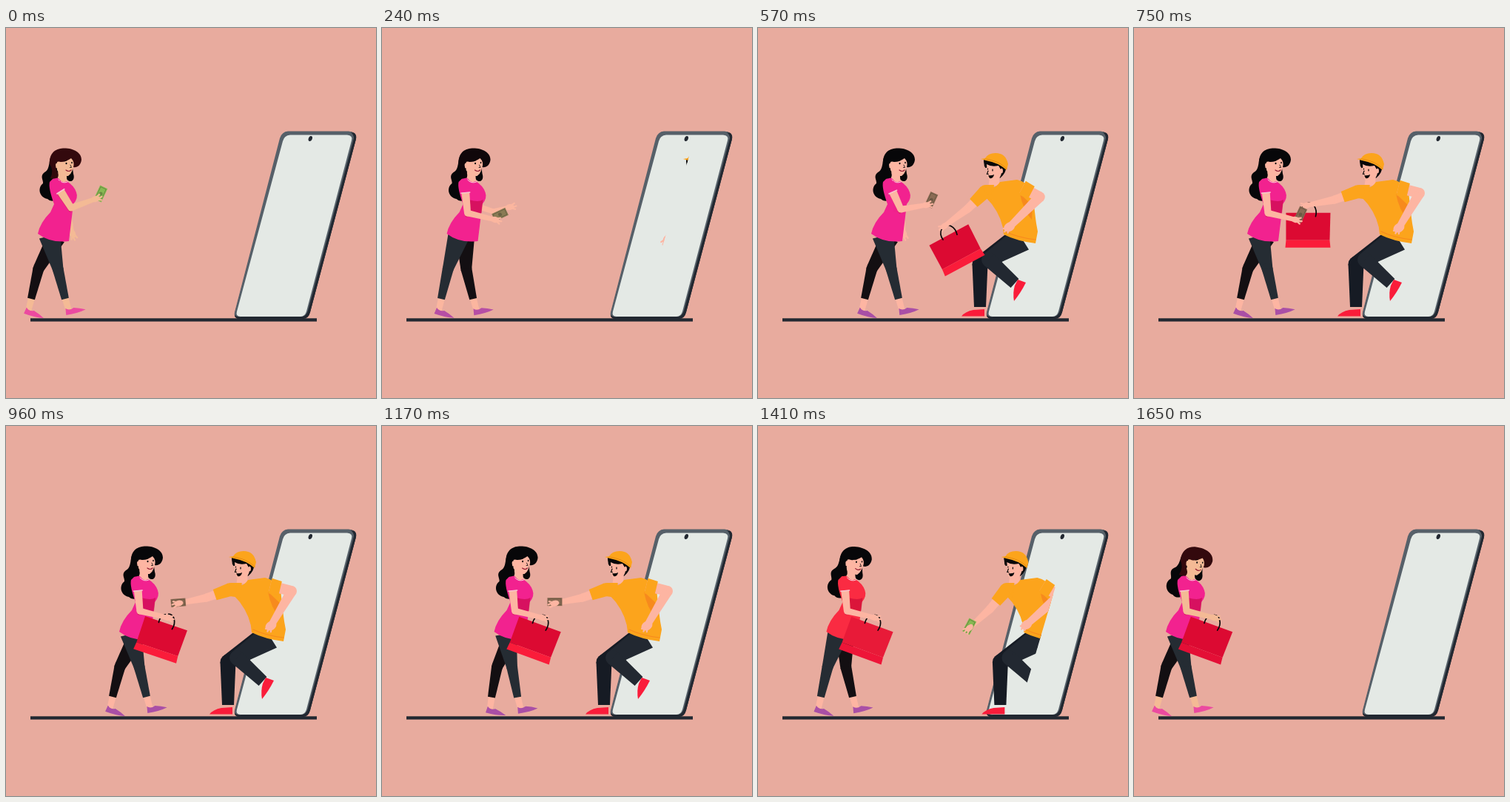
An HTML page with a canvas that plays this animation: 500x500 px, repeating every 1830 ms.

```html
<!DOCTYPE html>
<html lang="en">
<head>
<meta charset="utf-8">
<title>Delivery through the phone</title>
<style>
  html, body { margin: 0; width: 100%; height: 100%; overflow: hidden; background: #e8ab9e; }
  canvas { display: block; width: 500px; height: 500px; }
</style>
</head>
<body>
<canvas id="stage" width="500" height="500"></canvas>
<script>
const ctx = document.getElementById('stage').getContext('2d');
const LOOP = 1830, STEP = 30, LAST = 1650, STRIDE = 540, RAD = Math.PI / 180;
const INK = '#222831', BLACK = '#070709', RED = '#fa1c3a', ORANGE = '#fca41c', SKIN = '#fdb5a2';

const clamp = v => Math.max(0, Math.min(1, v));
const mix = (a, b, k) => a + (b - a) * k;
const mixPoint = (a, b, k) => a.map((v, i) => mix(v, b[i], k));
const shift = ([x, y], dx, dy = 0) => [x + dx, y + dy];
const polar = ([x, y], degrees, r) => [x + r * Math.cos(degrees * RAD), y + r * Math.sin(degrees * RAD)];
const toward = (a, b, d) => mixPoint(a, b, d / Math.hypot(b[0] - a[0], b[1] - a[1]));
const smooth = v => { const k = clamp(v); return k * k * (3 - 2 * k); };
const phase = (t, start, length) => smooth((t - start) / length);
const rgb = hex => [1, 3, 5].map(i => parseInt(hex.slice(i, i + 2), 16));
const blend = (a, b, k) => `rgb(${mixPoint(rgb(a), rgb(b), k).map(Math.round)})`;

// Everything that moves, as a function of time.
function pose(t) {
  const arrived = phase(t, 0, 550), returned = phase(t, 1135, 515);
  const offered = phase(t, 420, 310), swap = phase(t, 760, 240);
  const leaving = clamp((t - 1170) / 480);
  const reach = offered - smooth(leaving * 1.2);
  const gait = t < 1000 ? Math.min(t, STRIDE) : Math.max(0, t - 1110);
  const raise = t < 480 ? .5 + .5 * Math.cos(2 * Math.PI * t / 480) : 1 - phase(t, 480, 250);
  const farForward = t < 480 ? 1 - raise : 0;
  const armTurn = mix(117, 165, reach);
  const manShoulder = [mix(311, 303, reach), 221];
  const edge = clamp(Math.max(1 - t / 300, (t - 1500) / 150));
  const blush = clamp(1 - Math.abs(t - 1410) / 240);
  const bag = blend('#dc0a32', '#e81a38', blush);
  return {
    swap, manShoulder, bag,
    walk: 110 * (arrived - returned),
    slide: 178 * (1 - arrived + leaving ** 2.7),
    swing: Math.cos(2 * Math.PI * gait / STRIDE),
    nod: 9 * returned,
    shade: clamp(1.2 - raise * 1.6),
    elbow: mixPoint([71, 250], [88, 243], raise),
    hand: mixPoint([108, 259], [121, 231], raise),
    farHand: mixPoint([80 + 10 * raise, 278], [128, 242], farForward),
    manElbow: polar(manShoulder, armTurn - 4, 34),
    manHand: polar(manShoulder, armTurn, 72),
    backElbow: mixPoint([376, 233], [386, 223], reach),
    backHand: mixPoint([323, 268], [358, 270], reach),
    bagHang: mixPoint([9, 14], [2, 10], offered),
    bagTurn: -54 * (1 - offered) + 20 * swap,
    noteTurn: mix(-25 - 40 * (1 - farForward), 2 * (armTurn - 165), swap),
    hair: blend(BLACK, '#33090d', edge),
    shoe: blend('#a94fa6', '#eb4aa0', edge),
    skin: blend(SKIN, '#f4ba95', edge),
    top: blend('#f2228f', '#fa2b42', blush),
    note: blend('#8a6b54', '#86b952', Math.max(edge, blush)),
    fold: blend(RED, '#e40f36', returned)
  };
}

function fill(color, d) { ctx.fillStyle = color; ctx.fill(new Path2D(d)); }
function line(color, width, d) {
  ctx.strokeStyle = color; ctx.lineWidth = width; ctx.lineCap = 'round';
  ctx.stroke(new Path2D(d));
}
function oval(color, x, y, rx, ry = rx, turn = 0) {
  ctx.fillStyle = color;
  ctx.beginPath(); ctx.ellipse(x, y, rx, ry, turn, 0, 7); ctx.fill();
}
function at(x, y, degrees, draw) {
  ctx.save(); ctx.translate(x, y); ctx.rotate(degrees * RAD); draw(); ctx.restore();
}
// Tapered limb through [x, y, width] points, rounded at inner joints.
function limb(color, ...pts) {
  for (let i = 1; i < pts.length; i++) {
    const [ax, ay, aw] = pts[i - 1], [bx, by, bw] = pts[i];
    const len = Math.hypot(bx - ax, by - ay) || 1;
    const nx = (ay - by) / len / 2, ny = (bx - ax) / len / 2;
    fill(color, `M${ax + nx * aw} ${ay + ny * aw}L${bx + nx * bw} ${by + ny * bw}
      L${bx - nx * bw} ${by - ny * bw}L${ax - nx * aw} ${ay - ny * aw}Z`);
    if (i < pts.length - 1) oval(color, bx, by, bw / 2);
  }
}
function palm(color, from, to) {
  const turn = Math.atan2(to[1] - from[1], to[0] - from[0]);
  oval(color, ...to, 6, 4, turn);
  at(...to, turn / RAD, () => line(color, 2.2, 'M2 -2L7 -4M4 1L9 0M3 2L7 4'));
}

function scene() {
  ctx.fillStyle = '#e8ab9e';
  ctx.fillRect(0, 0, 500, 500);
  ctx.fillStyle = INK;
  ctx.fillRect(33, 392.3, 387, 4.3);
  fill(INK, 'M383 140H463Q475 140 473 150L411 384Q409 393 401 393H316Q308 393 309 386L371 149Q374 140 383 140Z');
  fill('#566069', 'M381 139.5H463Q472 140 471 149L409 383Q407 391 400 391H315Q307 391 309 384L370 149Q373 140 381 139.5Z');
  fill(INK, 'M466 141Q474 142 473 150L411 384Q409 392 401 393H316Q309 393 309 387Q311 391 318 390H400Q406 389 408 382L470 149Q470 144 466 141Z');
  fill('#e4e9e5', 'M384 144.5H461Q469 145 467 152L406 383Q404 390 398 390H317Q310 390 312 383L374 153Q376 145 384 144.5Z');
  oval(INK, 411.3, 149.5, 2.5, 3.6, .35);
}

function manBody() {
  limb('#161b24', [344, 288, 26], [300, 319, 21], [300, 377, 16]);
  fill(RED, 'M306 380V389.500H275Q280 383 291 381Z');
  limb(INK, [357, 285, 34], [312, 313, 20], [347, 345, 16]);
  fill(RED, 'M351 340L362 344Q355 358 346 369Q344 358 347 348Z');
  limb(SKIN, [320, 196, 12], [319, 213, 15]);
  fill(ORANGE, 'M311 213Q320 219 327 208L350 205Q364 208 371 221Q374 250 376 264L378 275L375 291Q350 288 332 279Q331 258 316 238L307 228Q304 217 311 213Z');
  fill('#f78a1d', 'M354 224Q358 246 370 259L371 240Z');
  line('#f78a1d', 1.2, 'M334 275Q350 283 375 286');
  manHead();
}

function manHead() {
  fill(BLACK, 'M305 178H335Q337 193 331 199L327 203L320 188L307 189Z');
  fill(SKIN, 'M309 184L310 201Q314 210 322 206Q329 202 329 194L326 186Z');
  oval(SKIN, 328.5, 193, 2.5, 3.5);
  fill(BLACK, 'M305 179H334L328 191L325 186Q315 188 309 184L306 188Z');
  fill(ORANGE, 'M301 177L307 176Q311 169 321 169Q335 169 338 184L336 192Q325 182 308 179Z');
  line('#e58a12', 1, 'M307 177Q325 179 336 190');
  line(BLACK, 1.2, 'M311 193L309.500 197.500H311.500M310.500 190V191M317 191V193');
  fill(BLACK, 'M311 199Q315 200 319 198Q318 204 313 203Z');
}

function manArms(p) {
  const front = p.manShoulder, back = [357, 216];
  limb(SKIN, [...back, 15], [...p.backElbow, 14], [...p.backHand, 9]);
  oval(SKIN, ...p.backHand, 8, 6, 2.6);
  palm(SKIN, p.backElbow, p.backHand);
  limb(ORANGE, [...back, 21], [...toward(back, p.backElbow, 14), 19]);
  limb(SKIN, [...front, 13], [...p.manElbow, 11], [...p.manHand, 6]);
  palm(SKIN, p.manElbow, p.manHand);
  limb(ORANGE, [318, 222, 20], [...front, 18], [...toward(front, p.manElbow, 22), 15]);
}

// swing: 1 is a full step forward, -1 a full step back.
function leg(p, color, hip, swing) {
  const ankle = [57 + 23 * swing, 369 - 3 * Math.abs(swing)];
  at(...ankle, swing < 0 ? -24 * swing : -6 * swing, () => {
    limb(p.skin, [0, -2, 9], [3, 16, 8]);
    fill(p.shoe, 'M-1 13Q4 17 10 13Q18 14 26 17Q16 21 -1 22Z');
  });
  limb(color, hip, [57 + 13 * swing, 325, 15], [...ankle, 10]);
}

function womanBody(p) {
  const tilt = draw => at(74, 207, p.nod, () => { ctx.translate(-74, -207); draw(); });
  tilt(() => fill(BLACK, 'M66 168C55 174 62 190 52 195C45 200 51 206 50 210C42 216 45 229 56 231Q60 235 66 233L72 205L80 199C82 211 95 209 91 197L88 175Z'));
  limb(p.skin, [82, 240, 8], [...mixPoint([84, 254], p.farHand, .5), 7], [...p.farHand, 5]);
  palm(p.skin, [80, 250], p.farHand);
  leg(p, '#130f12', [68, 283, 25], -p.swing);
  leg(p, '#252c33', [59, 281, 29], p.swing);
  limb(p.skin, [76, 192, 11], [76, 210, 13]);
  fill(p.top, 'M64 203Q69 201 72 204Q76 210 82 207Q92 213 95 222Q98 230 91 238L89 255L85 288Q60 291 43 278Q46 263 60 249L65 238Q57 216 59 208Z');
  ctx.globalAlpha = p.shade;
  fill('rgba(190,0,50,.5)', 'M73 232Q86 236 92 232L90 250Q82 252 73 248Z');
  ctx.globalAlpha = 1;
  line('#fbd3dc', 1, 'M71 205Q76 211 83 208');
  tilt(() => womanHead(p));
}

function womanHead(p) {
  fill(p.skin, 'M69 179V192Q74 201 84 200Q91 196 91.500 180L86 172Z');
  oval(p.skin, 69, 186, 3, 3.5);
  fill(p.hair, 'M59 184C58 169 67 163 77 162.500C91 162 102 168 102 178C101 186 96 189 91 188Q93 181 88 176Q81 181 74 181Q68 179 67 185L68 192Q72 198 70 202Q64 205 60 203Q65 192 59 184Z');
  oval(BLACK, 81.5, 183, 1, 1.3);
  oval(BLACK, 89, 182, .8, 1.2);
  line(BLACK, .8, 'M79 180L82 179M87 185L88.500 188.500H86.500');
  line('#8f1730', 1.2, 'M81 192Q85 195 88 192');
}

function womanArm(p) {
  const shoulder = [67, 210], cuff = toward(shoulder, p.elbow, 12);
  line('rgba(200,30,70,.6)', 5, `M${shift(cuff, -1, 5)}L${shift(p.elbow, -1, 3)}`);
  limb(p.skin, [...cuff, 11], [...p.elbow, 9], [...p.hand, 6]);
  limb(p.top, [...shoulder, 15], [...cuff, 14]);
  limb('#f7c5d0', [...cuff, 13], [...toward(shoulder, p.elbow, 13.5), 13]);
}

function bag(p, x, y) {
  at(x, y, p.bagTurn, () => {
    fill(p.bag, 'M-30 0H30L29 37H-30Z');
    fill(p.fold, 'M-30 37H29L30 47H-31Z');
    line(BLACK, 1.7, 'M-10 2C-11 -6 -8 -9 -5 -11M10 5C13 -6 6 -15 -1 -13');
  });
}

function note(p, x, y) {
  at(x, y, p.noteTurn, () => {
    ctx.fillStyle = p.note;
    ctx.fillRect(-10, -5.5, 20, 11);
    ctx.strokeStyle = 'rgba(50,50,35,.4)';
    ctx.lineWidth = .8;
    ctx.strokeRect(-8.5, -4, 17, 8);
    oval('rgba(50,50,35,.35)', 0, 0, 2.5);
  });
}

function render(t) {
  const p = pose(t);
  const his = shift(p.manHand, p.slide), hers = shift(p.hand, p.walk);
  const moved = (dx, draw) => at(dx, 0, 0, () => draw(p));

  scene();
  ctx.save();
  // The screen plane hides everything still inside the phone.
  ctx.clip(new Path2D('M0 0H466L348 400V500H0Z'));
  moved(p.slide, manBody);
  moved(p.walk, womanBody);
  // Bag and note change hands.
  if (p.slide < 100) bag(p, ...mixPoint(shift(his, ...p.bagHang), shift(hers, -3, 9), p.swap));
  else if (p.swap) bag(p, ...shift(hers, -3, 9));
  moved(p.slide, manArms);
  moved(p.walk, womanArm);
  note(p, ...mixPoint(shift(hers, 7, -7), shift(his, 0, -2), p.swap));
  moved(p.walk, () => palm(p.skin, p.elbow, p.hand));
  if (p.swap > .5) moved(p.slide, () => palm(SKIN, p.manElbow, p.manHand));
  ctx.restore();
}

const start = performance.now();
function tick() {
  const t = (performance.now() - start) % LOOP;
  render(Math.min(LAST, Math.floor(t / STEP) * STEP));
  requestAnimationFrame(tick);
}
tick();
</script>
</body>
</html>
```
